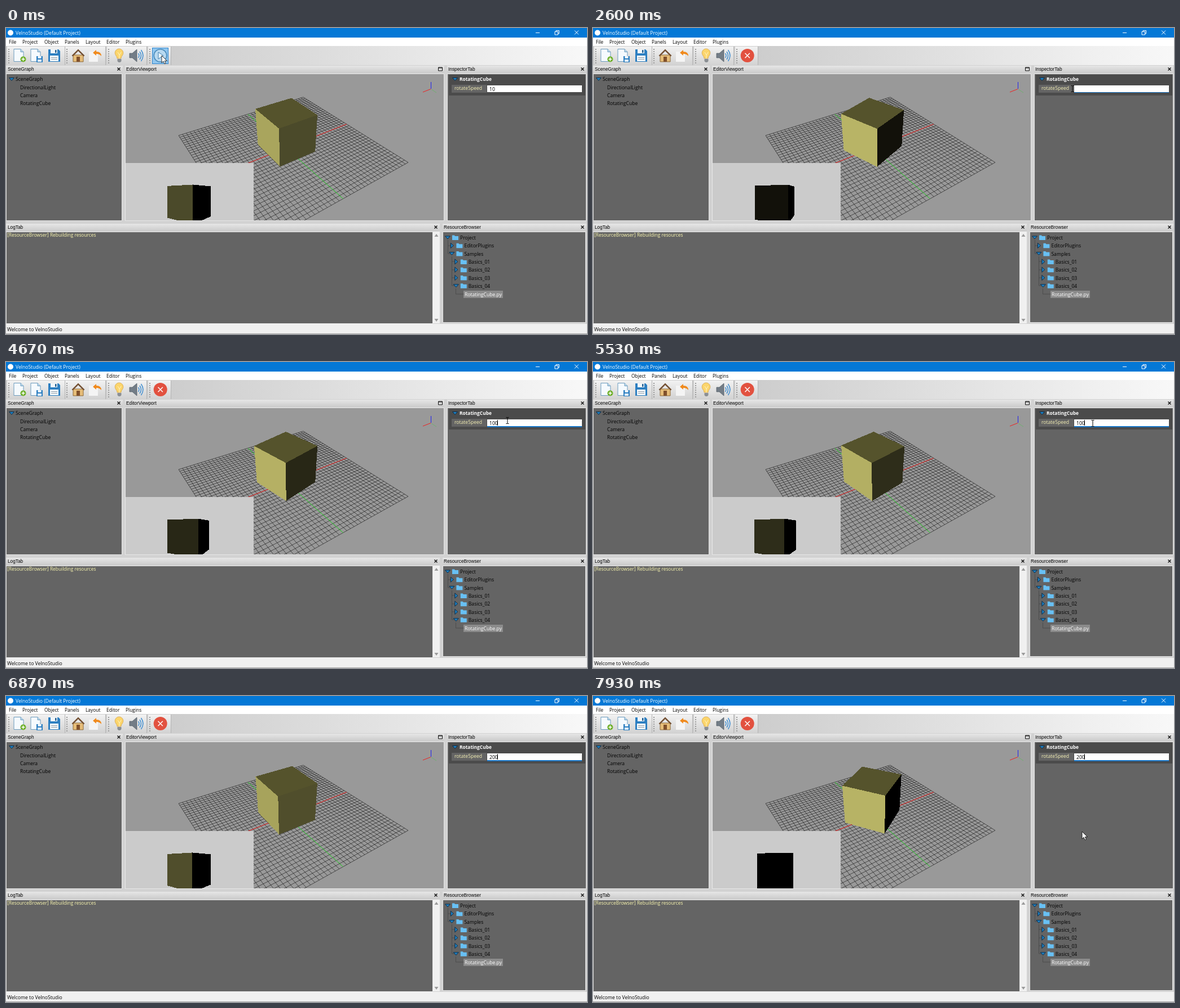
Animation, 1030 px wide and 544 px high, one loop 8 s. Source, as an HTML page:

```html
<!DOCTYPE html>
<html lang="en">
<head>
<meta charset="utf-8">
<title>Rotating cube editor</title>
<style>
html, body { margin: 0; width: 100%; height: 100%; overflow: hidden; background: #d2d2d2; }
svg { display: block; width: 1030px; height: 544px; }
text { font: 8.6px "Open Sans", "Noto Sans", sans-serif; white-space: pre; }
.menu { font-size: 8.4px; }
.cap { font: 8.3px "Liberation Sans", Arial, sans-serif; }
.bold { font-weight: 700; font-size: 8.4px; }
.crisp { shape-rendering: crispEdges; }
.line { fill: none; stroke-width: 1; }
#grid { stroke: #000; stroke-width: .55; }
</style>
</head>
<body>
<svg viewBox="0 0 1030 544" xmlns="http://www.w3.org/2000/svg">
  <defs>
    <linearGradient id="bar"><stop offset=".28" stop-color="#cdcdcd"/><stop offset="1" stop-color="#f8f8f8"/></linearGradient>
    <linearGradient id="tools" x2="0" y2="1"><stop stop-color="#f2f2f2"/><stop offset="1" stop-color="#d2d2d2"/></linearGradient>
    <linearGradient id="caption" x2="0" y2="1"><stop stop-color="#e6e6e6"/><stop offset="1" stop-color="#cbcbcb"/></linearGradient>
    <clipPath id="viewClip"><path d="M212 82H776V342H212Z"/></clipPath>
    <clipPath id="insetClip"><path d="M212 240H439V342H212Z"/></clipPath>
  </defs>

  <g class="crisp">
    <rect width="1030" height="544" fill="#d2d2d2"/>
    <rect width="1030" height="17" fill="#0478d6"/>
    <rect y="17" width="1030" height="15" fill="#fff"/>
    <rect y="32" width="1030" height="34" fill="url(#bar)"/>
    <rect y="526" width="1030" height="18" fill="#f0f0f0"/>
    <rect y="543" width="1030" height="1" fill="#a5a5a5"/>
  </g>
  <circle cx="8" cy="8.5" r="5" fill="#fff"/>
  <path class="line" stroke="#fff" d="M939 8.500h7M973 6.500h5.500v5.500h-5.500zM975 6.500v-2h5.500v5.500h-2M1008 4.500l7 7m0-7l-7 7"/>
  <g id="chrome" class="crisp"></g>

  <g id="icons">
    <g id="docs"></g>
    <path d="M75 38h18l3 3v19H75z" fill="#2d7fc1"/>
    <path d="M79 38h12v7H79zM78 49h15v10H78z" fill="#f3f7fa"/>
    <path d="M87 39h2.500v5H87z" fill="#245f91"/>
    <path class="line" stroke="#8d9aa5" d="M80 52.500h11M80 55.500h11"/>
    <path d="M119 48h18v12h-18z" fill="#e6bd79" stroke="#8a6636"/>
    <path d="M116.500 49L128 37.500 139.500 49l-2 1.500L128 41l-9.500 9.500z" fill="#735033"/>
    <path d="M125 51h6v9h-6z" fill="#80502b"/>
    <path d="M147 42h16v18h-16z" fill="#f4f4f4"/>
    <path d="M154 44l6-5v3q9 0 9 8-3-4-9-4v3z" fill="#f08a1d"/>
    <path d="M197 54q0-3-2-5a7.300 7.300 0 1 1 11 0q-2 2-2 5z" fill="#fbd56c" stroke="#d7a242" stroke-width=".8"/>
    <path d="M198 43l3 5 3-5M201 48v6" fill="none" stroke="#fff3c0"/>
    <path d="M197.500 55h7v4l-2 2h-3l-2-2z" fill="#8b8f94"/>
    <path d="M219 45h5l8-7v22l-8-7h-5z" fill="#737d87" stroke="#4d5660" stroke-width=".7"/>
    <path d="M234.500 45q3 4 0 8M237 42q5 7 0 14M239.500 39q7 10 0 20" fill="none" stroke="#3a8bd0" stroke-width="1.400"/>
  </g>
  <g id="play">
    <path class="crisp" d="M259.500 35.500h28v28h-28z" fill="#91c6ee" stroke="#2e86cf"/>
    <circle cx="273.500" cy="49" r="11.300" fill="#b8d9f0" stroke="#4688b8" stroke-width="1.500"/>
    <path d="M270 43l9 6-9 6z" fill="#e9f5fd" stroke="#3c7cad"/>
  </g>
  <g id="stop">
    <circle cx="273.700" cy="49" r="12" fill="#e2513f"/>
    <path d="M269.500 44.800l8.400 8.400m0-8.400l-8.400 8.400" stroke="#fff" stroke-width="1.500"/>
  </g>

  <g clip-path="url(#viewClip)">
    <rect x="212" y="82" width="564" height="260" fill="#999"/>
    <path id="grid" class="line"/>
    <path id="axisU" class="line" stroke="#f02020"/>
    <path id="axisV" class="line" stroke="#30e030"/>
    <g id="cube" class="crisp"></g>
    <path class="line" stroke="#2222f0" d="M753.500 96v12"/>
    <path class="line" stroke="#f02020" d="M753 108.500l-14 5.500"/>
    <path class="line" stroke="#6fb06f" d="M754 109l9 6"/>
  </g>
  <g class="crisp" clip-path="url(#insetClip)">
    <rect x="212" y="240" width="227" height="102" fill="#cbcbcb"/>
    <g id="inset"></g>
  </g>

  <g id="labels"></g>
  <text id="log" x="2" y="371" class="menu" fill="#fbf8b0">[ResourceBrowser] Rebuilding resources</text>

  <g class="crisp">
    <rect x="853" y="102" width="168" height="12" fill="#fff"/>
    <rect id="focus" x="853" y="114" width="168" fill="#1673c4"/>
    <rect id="selection" x="857" y="103" width="11" height="10" fill="#0078d7"/>
  </g>
  <text id="value" x="857" y="111.500"></text>
  <rect id="caret" class="crisp" y="103" width="1" height="10"/>

  <path id="arrow" d="M0 0V13l3-2.800 2.100 4.700 2.200-1-2-4.500H9.500z" fill="#fff" stroke="#000" stroke-width=".8"/>
  <path id="beam" class="line" stroke="#000" d="M-2.500-5.500H-.5L0-5 .5-5.500H2.500M0-5V5M-2.500 5.500H-.5L0 5 .5 5.500H2.500"/>
</svg>

<script>
const LOOP = 8000, FPS = 15;
const $ = id => document.getElementById(id);
const rad = deg => deg * Math.PI / 180;

function add(parent, tag, attrs, content) {
  const node = document.createElementNS('http://www.w3.org/2000/svg', tag);
  for (const key in attrs) node.setAttribute(key, attrs[key]);
  if (content) node.textContent = content;
  return parent.appendChild(node);
}
const rect = (x, y, width, height, fill) => add($('chrome'), 'rect', {x, y, width, height, fill});
const label = (text, x, y, fill = '#000', cls = '') => add($('labels'), 'text', {x, y, fill, class: cls}, text);
const shape = (d, attrs) => add($('labels'), 'path', {d, ...attrs});

// Window furniture
function toolbar() {
  for (const [x, w] of [[2, 102], [105, 71], [179, 70], [252, 40]]) {
    rect(x, 33, w, 33, 'url(#tools)');
    rect(x + w, 33, 1, 33, '#b4b4b4');
    for (let y = 37; y < 63; y += 4) rect(x + 2, y, 2, 2, '#9a9a9a');
  }
  for (const x of [14, 44]) {
    add($('docs'), 'path', {d: `M${x} 37.500h12l5 5v17h-17z`, fill: '#f5fafe', stroke: '#6c9bbd'});
    add($('docs'), 'path', {d: `M${x + 12} 37.500v5h5`, fill: '#bcd9ec', stroke: '#6c9bbd'});
  }
  add($('docs'), 'circle', {cx: 30.5, cy: 55.5, r: 5, fill: '#6daf27'});
  add($('docs'), 'path', {d: 'M27.500 55.500h6M30.500 52.500v6', stroke: '#fff', 'stroke-width': 1.6});
  add($('docs'), 'path', {d: 'M54 50h11v11H54z', fill: '#2d7fc1'});
  add($('docs'), 'path', {d: 'M56.500 50h6v4h-6zM56 56h7v4h-7z', fill: '#eef5fa'});
}

function panel(title, x, y, w, bodyX, bodyY, bodyW, bodyH, closable = true) {
  rect(x, y, w, 13, 'url(#caption)');
  rect(bodyX - 1, bodyY - 1, bodyW + 2, bodyH + 2, '#e6e6e6');
  rect(bodyX, bodyY, bodyW, bodyH, '#646464');
  label(title, x + (x ? 2 : 3), y + 9, '#000', 'cap');
  const cx = x + w - 7, cy = y + 6;
  shape(closable ? `M${cx - 2.5} ${cy - 2.5}l5 5m0-5l-5 5` : `M${cx - 3.5} ${cy - 3}h7v6h-7zM${cx - 3.5} ${cy - 2}h7`,
    {fill: 'none', stroke: '#111', 'stroke-width': closable ? 1.4 : 1});
}

const triangle = (x, y, open) => shape(
  open ? `M${x - 4.5} ${y - 2.5}h9l-4.500 5z` : `M${x - 2} ${y - 4.5}v9l5-4.500z`,
  {fill: '#1f7fc0', stroke: '#0b2c48', 'stroke-width': 1});
const folder = (x, y) => shape(`M${x} ${y - 4}h4l1 1.500h6v7h-11z`, {fill: '#68c0f4'});

function buildChrome() {
  label('VelnoStudio (Default Project)', 17, 12, '#fff');
  Object.entries({File: 5, Project: 29, Object: 68, Panels: 104, Layout: 141, Editor: 178, Plugins: 212})
    .forEach(([name, x]) => label(name, x, 28, '#000', 'menu'));
  toolbar();
  panel('SceneGraph', 0, 67, 207, 1, 82, 204, 260);
  panel('EditorViewport', 211, 67, 566, 212, 82, 564, 260, false);
  panel('InspectorTab', 782, 67, 247, 783, 82, 245, 260);
  panel('LogTab', 0, 348, 769, 1, 363, 755, 162);
  panel('ResourceBrowser', 774, 348, 255, 775, 363, 252, 160);

  rect(757, 362, 12, 163, '#f0f0f0');
  shape('M759.500 371h7l-3.500-5zM759.500 517h7l-3.500 5z', {fill: '#9a9a9a'});
  rect(785, 83, 242, 37, '#4b4b4b');
  rect(790, 101, 62, 14, '#646464');
  triangle(796, 91, true);
  label('RotatingCube', 804, 94, '#fff', 'bold');
  label('rotateSpeed', 795, 110, '#f4efb4');
  label('Welcome to VelnoStudio', 2, 539);

  triangle(10, 91, true);
  label('SceneGraph', 17, 94);
  ['DirectionalLight', 'Camera', 'RotatingCube'].forEach((name, i) => label(name, 25, 108.500 + 14.3 * i));

  shape('M783.500 377v24h7M790.500 387h-7M790.500 406v52h7M790.500 415h7M790.500 430h7M790.500 444h7M797.500 463v10h14',
    {fill: 'none', stroke: '#444', 'stroke-width': .7});
  rect(811, 467, 70, 13, '#8b8b8b');
  [['Project', 0, 1], ['EditorPlugins', 1, 0], ['Samples', 1, 1], ['Basics_01', 2, 0],
   ['Basics_02', 2, 0], ['Basics_03', 2, 0], ['Basics_04', 2, 1]].forEach(([name, depth, open], i) => {
    const x = 783 + 7.4 * depth, y = 372.5 + 14.3 * i;
    triangle(x, y, open);
    folder(x + 8, y);
    label(name, x + 22, y + 3.500);
  });
  label('RotatingCube.py', 813, 476.5, '#fff');
}

// Perspective of the main view: u and v span the grid from -1 to 1, z = 1 is the cube's top.
function project(u, v, z = 0) {
  const w = 1 + .1343 * u - .1977 * v - .08 * z;
  return [(496.6 + 188.3 * u - 17.1 * v - 40.2 * z) / w, (213.5 - 19.7 * u + 30 * v - 76.3 * z) / w];
}
const segment = (a, b) => `M${project(...a)}L${project(...b)}`;

function buildGrid(cells = 20) {
  let d = '';
  for (let i = -cells; i <= cells; i++) {
    const c = i / cells;
    d += segment([c, -1], [c, 1]) + segment([-1, c], [1, c]);
  }
  $('grid').setAttribute('d', d);
  $('axisU').setAttribute('d', segment([-1, 0], [1, 0]));
  $('axisV').setAttribute('d', segment([0, -1], [0, 1]));
}

// Each corner is [bottom, top] on screen, in order round the cube.
function viewCorner(k, angle) {
  const a = rad(135 - angle - 90 * k), r = .25 * Math.SQRT2;
  const u = r * Math.cos(a), v = r * Math.sin(a);
  return [project(u, v, 0), project(u, v, 1)];
}
function insetCorner(k, angle) {
  const a = rad(angle - 83 + 90 * k);
  const scale = 176 / (3.2 - Math.SQRT1_2 * Math.cos(a));
  const x = 325.4 + scale * Math.SQRT1_2 * Math.sin(a);
  return [[x, 290.8 + .825 * scale], [x, 290.8 - .175 * scale]];
}
function faceColor(k, angle) {
  const light = 185 * Math.max(0, Math.cos(rad(angle + 66 + 90 * k)));
  return `rgb(${[1, .977, .553].map(c => Math.round(c * light))})`;
}

function makeCube(parent, corner, hasTop) {
  const faces = [0, 1, 2, 3].map(() => add(parent, 'polygon', {}));
  const top = hasTop && add(parent, 'polygon', {fill: '#55532c'});
  return angle => {
    const corners = [0, 1, 2, 3].map(k => corner(k, angle));
    faces.forEach((face, k) => {
      const a = corners[k], b = corners[(k + 1) % 4];
      const visible = a[0][0] < b[0][0];
      face.setAttribute('points', visible ? [a[0], b[0], b[1], a[1]].join(' ') : '');
      face.setAttribute('fill', faceColor(k, angle));
    });
    if (top) top.setAttribute('points', corners.map(c => c[1]).join(' '));
  };
}

// Timelines: [ms, ...values]
const SPIN = [[0, 0], [666, 0], [2450, 18.2], [2600, 18.5], [3600, 20.5], [3860, 22.7], [4070, 43.7],
  [4670, 101.7], [5530, 189.2], [5733, 209.5], [5867, 211], [6467, 212.5], [6600, 215.2], [6870, 269.1], [8000, 496]];
const TYPED = [[0, '10'], [2590, ''], [3590, '1'], [3725, '10'], [3860, '100'], [5730, '10'], [5795, '1'],
  [5860, ''], [6260, '2'], [6460, '20'], [6595, '200']];
const POINTER = [[0, 276, 49, 1], [66, 276, 49, 0], [666, 276, 49, 1], [1000, 620, 90, 1], [1400, 897, 112, 1],
  [2340, 897, 112, 1], [2400, 870, 110, 1], [2560, 850, 108, 1], [2720, 850, 108, 0], [3790, 817, 102, 1],
  [4070, 817, 102, 1], [4333, 940, 105, 1], [4600, 889, 104, 1], [4800, 889, 104, 1], [5100, 886, 109, 1],
  [5720, 886, 109, 0], [7595, 866, 130, 1], [7900, 867, 241, 1], [8000, 867, 241, 1]];
const CARET_RESETS = [[2400], [3860], [4300], [5730], [6595]];

const latest = (table, t) => table.findLast(row => row[0] <= t);
function tween(table, t, column = 1) {
  const i = Math.max(0, table.findLastIndex(row => row[0] <= t));
  const a = table[i], b = table[i + 1] || a;
  const part = b === a ? 0 : (t - a[0]) / (b[0] - a[0]);
  return a[column] + (b[column] - a[column]) * part;
}
const show = (id, on) => $(id).style.display = on ? '' : 'none';

buildChrome();
buildGrid();
const drawCube = makeCube($('cube'), viewCorner, true);
const drawInset = makeCube($('inset'), insetCorner, false);

function render(t) {
  const angle = tween(SPIN, t) % 90;
  drawCube(angle);
  drawInset(angle);

  show('play', t < 660);
  show('stop', t >= 660);
  show('log', t < 66 || t >= 1000);

  const typed = latest(TYPED, t)[1];
  const selecting = t >= 2460 && t < 2590;
  $('value').textContent = typed;
  $('value').setAttribute('fill', selecting ? '#fff' : '#000');
  show('selection', selecting);
  $('focus').setAttribute('height', t < 2400 ? 0 : t < 2700 ? 1 : 2);

  const reset = latest(CARET_RESETS, t);
  show('caret', t >= 2700 && (t - reset[0]) % 1060 < 530);
  $('caret').setAttribute('x', Math.round(857 + 4.8 * typed.length));

  const x = tween(POINTER, t, 1), y = tween(POINTER, t, 2);
  const visible = latest(POINTER, t)[3], overField = x >= 849 && y > 101 && y < 117;
  show('arrow', visible && !overField);
  show('beam', visible && overField);
  for (const id of ['arrow', 'beam']) $(id).setAttribute('transform', `translate(${x} ${y})`);
}

const start = performance.now();
function tick() {
  const t = (performance.now() - start) % LOOP;
  render(Math.floor((t + 5) * FPS / 1000) * 1000 / FPS % LOOP);
  requestAnimationFrame(tick);
}
tick();
</script>
</body>
</html>
```
